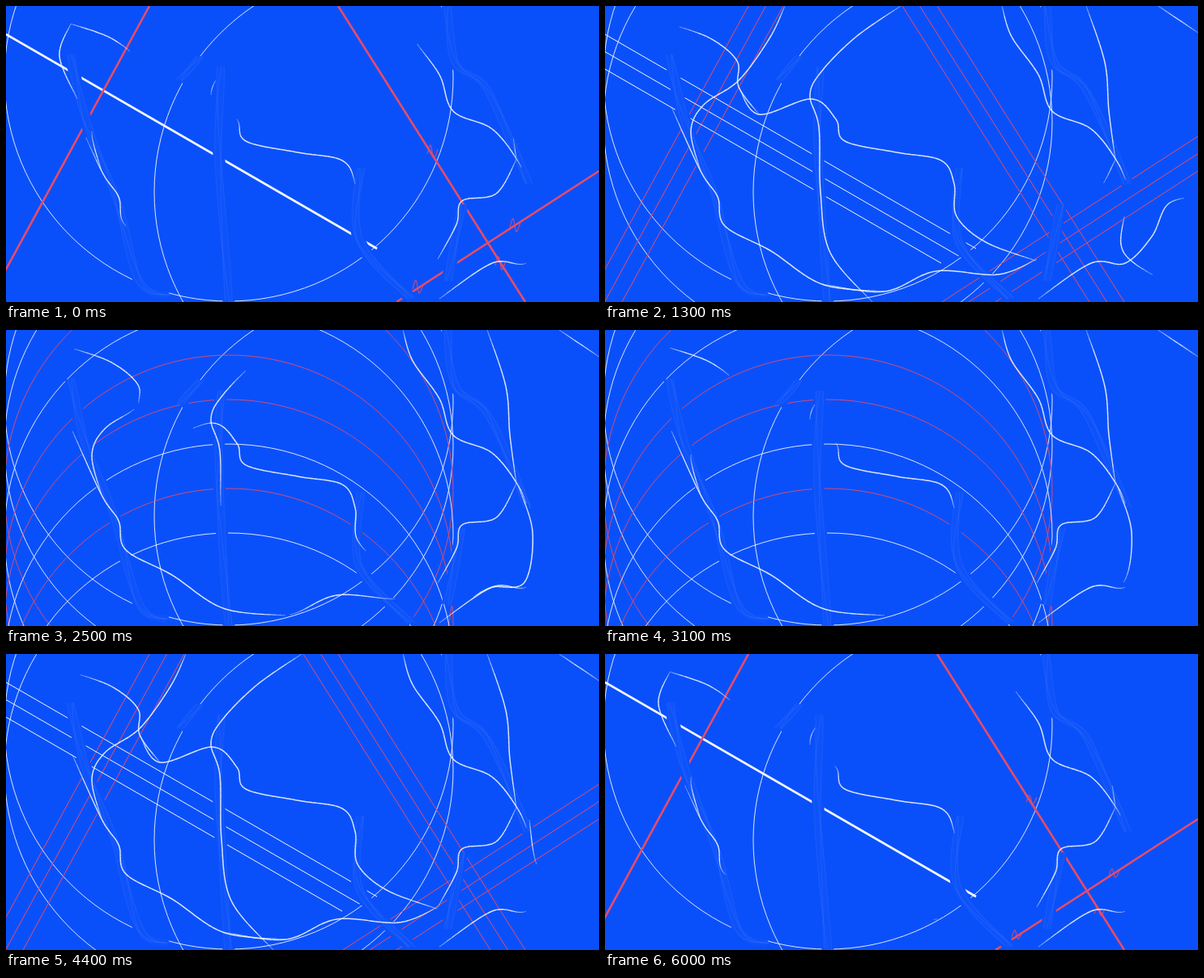
An HTML page with a canvas for the animation above (6100 ms loop, 732 by 366 pixels).

```html
<!DOCTYPE html>
<html lang="en">
<head>
<meta charset="utf-8">
<title>Flowing lines</title>
<style>
html, body { margin: 0; width: 100%; height: 100%; overflow: hidden; background: #0a50fa; }
canvas { display: block; }
</style>
</head>
<body>
<canvas id="stage" width="732" height="366"></canvas>
<script>
const ctx = document.getElementById('stage').getContext('2d');
const LOOP = 6100, BLUE = '#0a50fa', RED = '#e94b66', WHITE = '#f4f8ff';

const clamp = v => Math.max(0, Math.min(1, v));
const mix = (a, b, f) => a + (b - a) * f;

// Catmull-Rom position on a flat list of x, y pairs; u counts control points.
function pointAt(pts, u) {
  const last = pts.length / 2 - 1;
  const i = Math.min(Math.floor(u), last - 1), f = u - i;
  return [0, 1].map(axis => {
    const [a, b, c, d] = [-1, 0, 1, 2].map(k => pts[2 * Math.max(0, Math.min(last, i + k)) + axis]);
    return b + f / 2 * (c - a + f * (2 * a - 5 * b + 4 * c - d + f * (3 * (b - c) + d - a)));
  });
}

function trace(pts, from = 0, to = pts.length / 2 - 1, sway = () => 0) {
  const steps = Math.max(2, Math.ceil((to - from) * 10));
  ctx.beginPath();
  for (let i = 0; i <= steps; i++) {
    const u = mix(from, to, i / steps), [x, y] = pointAt(pts, u);
    ctx.lineTo(x + sway(u), y);
  }
}

function stroke(color, width, alpha = 1) {
  ctx.strokeStyle = color;
  ctx.lineWidth = width;
  ctx.globalAlpha = alpha;
  ctx.stroke();
  ctx.globalAlpha = 1;
}

// How far a thread has opened, 0 to 1, at time t.
const swell = cycles => t => clamp(3.2 / cycles * (0.5 - 0.5 * Math.cos(2 * Math.PI * cycles * t / LOOP)));
const pulse = peak => t => clamp(1.5 - Math.abs(t - peak) / 600);

// The visible span of a thread glides between its closed and open extents.
const threads = [];
const thread = (opening, closed, open, ...pts) => threads.push({ opening, closed, open, pts });

thread(swell(1), [0, 2], [2, 2], 88,115, 66,62, 80,22);
thread(swell(2), [0, 1.6], [0.3, 4], 80,22, 130,40, 163,68, 165,100, 190,134);
thread(swell(2), [3, 7], [0, 10], 165,100, 190,134, 255,115, 285,140, 296,167, 360,181,
  415,191, 431,220, 434,260, 470,292, 532,315);
thread(swell(2), [2.4, 3], [0, 7], 365,0, 310,38, 268,80, 253,110, 264,150, 266,230, 278,305, 330,366);
thread(swell(2), [4, 5], [0, 5], 222,0, 203,40, 165,92, 122,122, 106,155, 118,204);
thread(swell(1), [0.5, 3], [0, 6], 82,125, 118,204, 139,236, 148,272, 205,303, 268,344, 345,353);
thread(swell(2), [2, 2], [0, 4], 268,344, 345,353, 408,328, 485,332, 533,313);
thread(pulse(900), [0, 4], [4, 4], 533,313, 556,270, 563,241, 605,232, 630,190);
thread(swell(1), [0, 0.5], [0, 3], 630,190, 622,130, 617,70, 594,0);
thread(swell(1), [1.2, 5.2], [0, 5.6], 490,0, 502,38, 535,85, 552,130, 600,152, 632,192, 646,225);
thread(pulse(2500), [0, 0], [0, 4], 632,192, 650,250, 640,312, 600,318, 577,330);
thread(pulse(900), [0, 2], [0, 5], 535,362, 600,318, 642,318, 675,285, 695,245, 732,235);
thread(pulse(900), [0, 0], [0, 3], 641,260, 637,295, 652,317, 698,345);
thread(pulse(5100), [0, 0], [0, 3], 646,205, 655,260, 680,288, 720,345);
thread(swell(1), [0, 0], [0, 1], 683,0, 732,33);

// Faint veils that also break the geometry beneath them.
const veils = [
  [80,60, 98,140, 135,235, 165,340, 200,358],
  [265,75, 263,190, 275,366],
  [438,200, 436,290, 500,362],
  [545,0, 555,70, 595,105, 645,220],
  [563,245, 545,340],
  [214,92, 240,62],
];

function line(x1, y1, x2, y2, color, width) {
  ctx.beginPath();
  ctx.moveTo(x1, y1);
  ctx.lineTo(x2, y2);
  stroke(color, width);
}

function arc(x, y, color, from = 0, to = 2 * Math.PI) {
  ctx.beginPath();
  ctx.arc(x, y, 277, from, to);
  stroke(color, 1, 0.9);
}

function drawLines(count, width) {
  for (let i = 0; i < count; i++) {
    const d = i * 21.5;
    line(0, 35 + d, 458 - d, 300 + d * 0.42, WHITE, width);
    line(177 + d, 0, -22 + d, 366, RED, width);
    line(410 - d, 0, 641 - d, 366, RED, width);
    line(732, 204 - d, 482 - d * 1.54, 366, RED, width);
  }
}

function drawGeometry(t) {
  const rings = t >= 2400 && t < 3900;
  const triple = t >= 1300 && t < 4700;
  arc(460, 230, WHITE, Math.PI / 2, Math.PI * 1.5);
  const colors = rings ? 'wwrwrrwrw' : triple ? 'ww' : 'w';
  [...colors].forEach((c, i) => arc(275, 88 + 55 * i, c === 'r' ? RED : WHITE));
  if (!rings) drawLines(triple ? 3 : 1, triple ? 1 : 2.6);
}

function drawVeils(t) {
  for (const pts of veils) {
    trace(pts);
    stroke(BLUE, 15);
  }
  const phase = t / LOOP * 2 * Math.PI;
  veils.forEach((pts, n) => {
    trace(pts);
    stroke('#5c92ff', 9, 0.05);
    for (let k = 0; k < 3; k++) {
      trace(pts, 0, undefined, u => 5 * Math.sin(u * 1.7 + k * 2 + n + 2 * phase));
      stroke('#8fb4ff', 1.2, 0.1);
    }
  });
}

// Small kinks that disturb the red lines around the turn of the loop.
function drawKinks(t) {
  if (t > 300 && t < 4900) return;
  const rise = 8 + 3 * Math.sin(t / 140);
  for (const [x, y] of [[526, 180], [610, 318], [628, 271], [508, 347]]) {
    trace([x - 6, y + 3, x - 2, y - rise, x + 2, y + rise, x + 7, y - 3]);
    stroke(RED, 1.2, 0.8);
  }
}

function drawThreads(t) {
  const step = 0.1;
  for (const { opening, closed, open, pts } of threads) {
    const [from, to] = [0, 1].map(k => mix(closed[k], open[k], opening(t)));
    for (let u = from; u < to; u += step) {
      const edge = Math.min(1, u - from + step, to - u);
      trace(pts, u, Math.min(to, u + step));
      stroke(WHITE, 1 + 0.5 * edge, 0.25 + 0.65 * Math.min(1, edge * 2));
    }
  }
}

function frame(now) {
  const t = Math.floor(now % LOOP / 100) * 100;
  ctx.fillStyle = BLUE;
  ctx.fillRect(0, 0, 732, 366);
  drawGeometry(t);
  drawVeils(t);
  drawKinks(t);
  drawThreads(t);
  requestAnimationFrame(frame);
}
requestAnimationFrame(frame);
</script>
</body>
</html>
```
